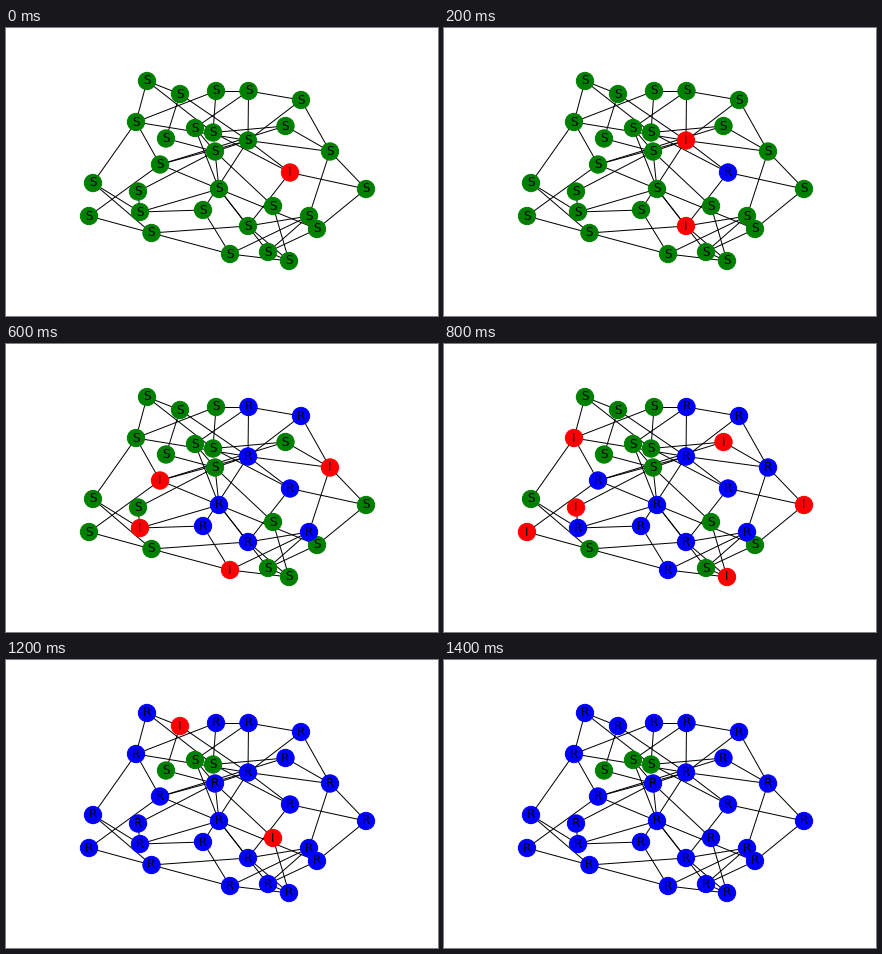
Animation, 432 px wide and 288 px high, one loop 1.6 s. Source, as a matplotlib script:

```python
import matplotlib.pyplot as plt
from matplotlib.animation import FuncAnimation
from matplotlib.collections import LineCollection

WIDTH, HEIGHT, DPI = 432, 288, 72
STEPS, INTERVAL = 8, 200
COLORS = {"S": "green", "I": "red", "R": "blue"}

NODES = {
    "A": (141, 53), "B": (174, 66), "C": (210, 63), "D": (242.5, 63),
    "E": (295, 72), "F": (130, 94), "G": (160, 110.5), "H": (189, 100),
    "J": (207, 104.5), "K": (242, 112.5), "L": (279.5, 98), "M": (324, 123.5),
    "N": (154, 136.5), "O": (209, 123.5), "P": (284, 144.5), "Q": (360, 161),
    "R": (213, 161), "S": (132, 163.5), "T": (87, 155), "U": (83, 188),
    "V": (134, 184), "W": (145.5, 205), "X": (197, 182), "Y": (242, 198),
    "Z": (267, 178), "b": (311, 201), "a": (303, 188), "c": (224, 226),
    "d": (262, 224), "e": (283, 233),
}

# Each node followed by the neighbours it links to.
LINKS = """
A:BFJ B:GK C:DFJ D:EHK E:KM F:KNT G:O H:OR J:LP K:MOPX
L:MN M:Qa N:KRU O:RSZ P:QY Q:b R:VYbd S:V T:VW U:W
V:X W:Yc X:c Y:ae Z:e a:cd b:d c:e d:e
"""

# Nodes that catch the infection at each step; they recover one step later.
WAVES = ["P", "KY", "DERXa", "MNVc", "FLQSUe", "ACOTWbd", "BZ"]
INFECTED_AT = {node: step for step, wave in enumerate(WAVES) for node in wave}


def state(node, step):
    caught = INFECTED_AT.get(node, STEPS)
    if step < caught:
        return "S"
    return "I" if step == caught else "R"


fig = plt.figure(figsize=(WIDTH / DPI, HEIGHT / DPI), dpi=DPI, facecolor="white")
ax = fig.add_axes([0, 0, 1, 1])
ax.set(xlim=(0, WIDTH), ylim=(HEIGHT, 0))
ax.axis("off")

segments = [
    (NODES[start], NODES[end])
    for start, ends in (entry.split(":") for entry in LINKS.split())
    for end in ends
]
ax.add_collection(LineCollection(segments, colors="black", linewidths=1, zorder=1))
dots = ax.scatter(*zip(*NODES.values()), s=300, linewidths=1, zorder=2)
labels = [
    ax.text(x, y, "S", fontsize=12, family="DejaVu Sans", color="black",
            ha="center", va="center", zorder=3)
    for x, y in NODES.values()
]


def update(step):
    states = [state(node, step) for node in NODES]
    dots.set_color([COLORS[s] for s in states])
    for label, s in zip(labels, states):
        label.set_text(s)
    return [dots, *labels]


animation = FuncAnimation(fig, update, frames=STEPS, interval=INTERVAL,
                          repeat=True, repeat_delay=0)
plt.show()
```
